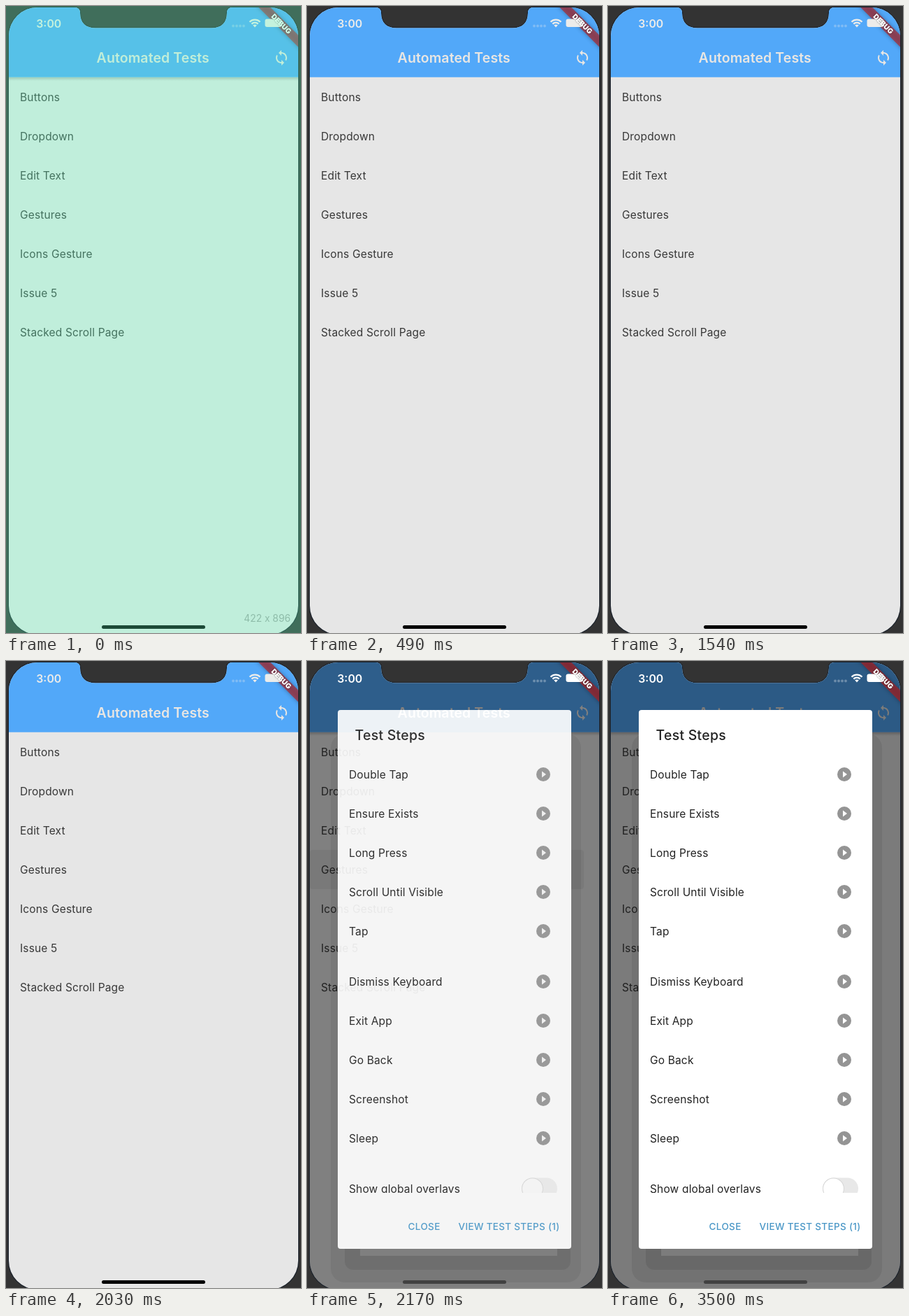
Animation, 422 px wide and 896 px high, one loop 3.64 s. Source, as an HTML page with a canvas:

```html
<!DOCTYPE html>
<html lang="en">
<head>
<meta charset="utf-8">
<title>Test steps dialog</title>
<style>
html, body { margin: 0; width: 100%; height: 100%; overflow: hidden; background: #333; }
canvas { display: block; width: 422px; height: 896px; }
</style>
</head>
<body>
<canvas id="stage" width="422" height="896"></canvas>
<script>
const LOOP = 3640;
const g = document.getElementById('stage').getContext('2d');

const pages = ['Buttons', 'Dropdown', 'Edit Text', 'Gestures', 'Icons Gesture', 'Issue 5', 'Stacked Scroll Page'];
const steps = ['Double Tap', 'Ensure Exists', 'Long Press', 'Scroll Until Visible', 'Tap',
  'Dismiss Keyboard', 'Exit App', 'Go Back', 'Screenshot', 'Sleep'];

const screen = new Path2D(`M45 2H98Q106 2 106 10C106 24 114 31.5 128 31.5H294C308 31.5 316 24 316 10
  Q316 2 324 2H377A41 41 0 0 1 418 43V857A41 41 0 0 1 377 898H45A41 41 0 0 1 4 857V43A41 41 0 0 1 45 2Z`);
const syncIcon = new Path2D(`M12 4V1L8 5l4 4V6c3.31 0 6 2.69 6 6 0 1.01-.25 1.97-.7 2.8l1.46 1.46
  C19.54 15.03 20 13.57 20 12c0-4.42-3.58-8-8-8zm0 14c-3.31 0-6-2.69-6-6 0-1.01.25-1.97.7-2.8
  L5.24 7.74C4.46 8.97 4 10.43 4 12c0 4.42 3.58 8 8 8v3l4-4-4-4v3z`);

// The dialog's fade advances in whole 70 ms steps.
const fade = [
  { at: 2100, dim: .31, paper: '#d6d7d8', ink: .7, ghost: .18, shade: .6, row: 414 },
  { at: 2170, dim: .445, paper: '#f5f5f5', ink: .94, ghost: .05, shade: .9, row: 392, tint: .05 },
  { at: 2240, dim: .46, paper: '#fcfcfc', ink: .98, ghost: .015, shade: 1, row: 0, tint: .015 },
  { at: 2310, dim: .465, paper: '#ffffff', ink: 1, ghost: 0, shade: 1, row: 0 }
];

function text(str, x, y, size, color, weight = 400, spacing = 0, align = 'left') {
  g.font = `${weight} ${size}px Inter, Roboto, sans-serif`;
  g.letterSpacing = spacing + 'px';
  g.textAlign = align;
  g.fillStyle = color;
  g.fillText(str, x, y);
}

const item = (str, x, y, color) => text(str, x, y + 5.7, 15.5, color, 400, .16);
const button = (str, x) => text(str, x, 812.7, 13.5, '#4896c6', 500, .33);

function box(x, y, w, h, r, color) {
  g.fillStyle = color;
  g.beginPath();
  g.roundRect(x, y, w, h, r);
  g.fill();
}

function disc(x, y, r, color) {
  g.fillStyle = color;
  g.beginPath();
  g.arc(x, y, r, 0, 7);
  g.fill();
}

function list(color) {
  pages.forEach((name, i) => item(name, 20, 130 + 56 * i, color));
}

function title(color) {
  text('Automated Tests', 129.6, 81, 19.5, color, 600, .1);
}

function page(state, first) {
  box(0, 0, 422, 896, 0, '#e6e6e6');
  if (state && state.row) box(4, 270, state.row, 56, 4, 'rgba(0,0,0,.06)');
  list('#383838');
  if (state || first) {
    const shadow = g.createLinearGradient(0, 102, 0, 107);
    shadow.addColorStop(0, 'rgba(0,0,0,.2)');
    shadow.addColorStop(1, 'rgba(0,0,0,0)');
    box(0, 102, 422, 5, 0, shadow);
  }
  box(0, 0, 422, 101.7, 0, '#52a8f9');
  title('#e8e6e3');
  g.save();
  g.translate(382, 62);
  g.fill(syncIcon);
  g.restore();
}

function stepRow(name, y, paper) {
  item(name, 60, y, '#222');
  disc(338, y, 10, '#949494');
  g.fillStyle = paper;
  g.fill(new Path2D(`M336 ${y - 4.5}l6 4.5-6 4.5z`));
}

function dialog(s) {
  box(0, 0, 422, 896, 0, `rgba(0,0,0,${s.dim})`);
  g.globalAlpha = s.shade;
  box(34, 104, 358, 784, 20, 'rgba(0,0,0,.07)');
  box(54, 800, 323, 70, 12, 'rgba(0,0,0,.09)');
  box(76, 830, 282, 20, 0, 'rgba(255,255,255,.13)');
  g.globalAlpha = 1;

  g.save();
  box(44, 70, 334, 770, 4, s.paper);
  g.clip();
  if (s.tint) {
    box(44, 70, 334, 32, 0, `rgba(82,168,249,${s.tint})`);
    title('#fff');
  }
  if (s.ghost) list(`rgba(0,0,0,${s.ghost})`);

  g.globalAlpha = s.ink;
  text('Test Steps', 68.6, 113, 19.4, '#222', 500, .28);
  steps.forEach((name, i) => stepRow(name, 162 + 56 * i + (i > 4 ? 16 : 0), s.paper));
  button('CLOSE', 144.6);
  button('VIEW TEST STEPS (1)', 216.5);

  // The last row is cut by the end of the scroll area.
  g.beginPath();
  g.rect(44, 70, 334, 690);
  g.clip();
  item('Show global overlays', 60, 754, '#222');
  if (s.ink > .9) {
    box(307, 738.5, 51, 31, 15.5, '#e8e8e8');
    disc(322.5, 754, 15.5, '#d6d6d6');
    disc(322.5, 754, 14.5, s.paper);
  }
  g.restore();
}

function statusBar(color) {
  text('3:00', 43.3, 30.6, 15.8, color, 600);
  g.globalAlpha = .3;
  for (let i = 0; i < 4; i++) disc(325 + 5 * i, 28.5, 1.9, color);
  g.globalAlpha = 1;
  g.strokeStyle = color;
  g.lineWidth = 2.3;
  for (const r of [6.6, 10.6]) {
    g.beginPath();
    g.arc(356, 30.3, r, -Math.PI * .75, -Math.PI * .25);
    g.stroke();
  }
  g.fillStyle = color;
  g.fill(new Path2D('M356 30.6l-2.8-3Q356 25.2 358.8 27.6z'));
}

function banner(color) {
  g.save();
  g.translate(418, 2);
  g.rotate(Math.PI / 4);
  g.shadowColor = 'rgba(0,0,0,.5)';
  g.shadowBlur = 6;
  box(-48, 28, 96, 12, 0, 'rgba(183,28,28,.627)');
  g.restore();

  box(370.5, 18.5, 24, 11.5, 3, color);

  g.save();
  g.translate(394, 25.5);
  g.rotate(Math.PI / 4);
  g.shadowColor = 'rgba(0,0,0,.5)';
  g.shadowBlur = 2;
  text('DEBUG', 0, 3.7, 10.2, '#fff', 900, 0, 'center');
  g.restore();
}

function draw(t) {
  const state = fade.findLast(s => t >= s.at);
  const first = t < 70;
  const light = state ? '#fff' : '#ececea';

  box(0, 0, 422, 896, 0, '#333');
  g.strokeStyle = 'rgba(20,30,42,.75)';
  g.lineWidth = 2.4;
  g.stroke(screen);

  g.save();
  g.clip(screen);
  page(state, first);
  if (state) dialog(state);
  statusBar(light);
  banner(light);
  box(137, 885, 148, 5, 2.5, state ? '#414141' : '#000');
  if (first) text('422 x 896', 407, 880, 13.8, '#a0a0a0', 400, 0, 'right');
  g.restore();

  if (first) box(0, 0, 422, 896, 0, 'rgba(97,255,190,.29)');
}

function tick(now) {
  draw(now % LOOP);
  requestAnimationFrame(tick);
}
requestAnimationFrame(tick);
</script>
</body>
</html>
```
